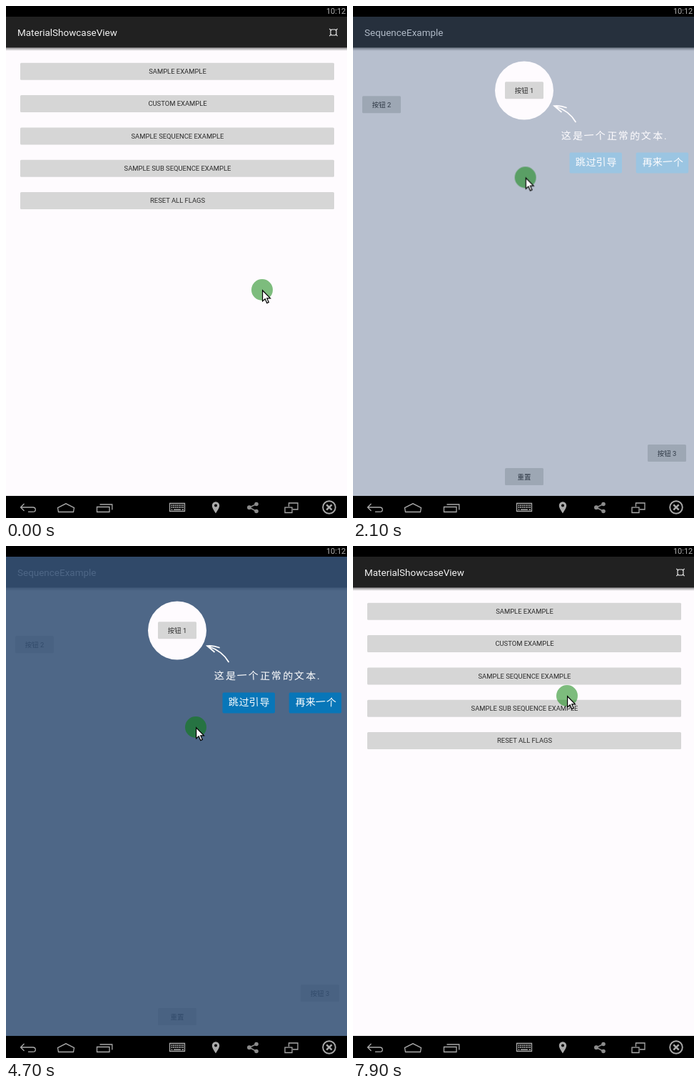
Animation, 478 px wide and 718 px high, one loop 8000 ms. Source, as an HTML page:

```html
<!DOCTYPE html>
<html lang="en">
<head>
<meta charset="utf-8">
<title>Showcase sequence</title>
<style>
  html, body { margin: 0; width: 100%; height: 100%; overflow: hidden; background: #000; }
  svg { display: block; width: 478px; height: 718px; }
  text { font-family: Roboto, "Noto Sans CJK SC", "Noto Sans CJK", sans-serif; }
  .title { font-size: 13.47px; fill: #f2f2f2; }
  .page { fill: #fefbfe; }
  .btn { fill: #d6d6d6; }
  .label { font-size: 9.42px; fill: #2b2b2b; text-anchor: middle; }
  .hand { font-family: "Noto Sans CJK SC", "Noto Sans CJK", sans-serif; font-size: 14px; font-weight: 400; fill: #fff; }
  .cta { fill: #0876b8; }
  .icon { fill: none; stroke: #aaa; stroke-width: 1.3; }
  .solid { fill: #aaa; }

  /* One tick is 200 ms = 2.5% of the loop. */
  .window, .dim, .showcase, .press, .glow, .pointer { animation: 8s step-end infinite; }
  .window { animation-name: window; transform-origin: 240px 350px; }
  .dim { animation-name: dim; }
  .showcase { animation-name: showcase; }
  .press { animation-name: press; }
  .glow { animation-name: glow; }
  .pointer { animation-name: pointer; }

  @keyframes window {
    0% { opacity: 0; transform: scale(.8); }
    21.25% { opacity: .52; transform: scale(.912); }
    23.75% { opacity: 1; transform: scale(1); }
    76.25% { opacity: .5; transform: scale(.88); }
    78.75% { opacity: .045; transform: scale(.807); }
    81.25%, 100% { opacity: 0; transform: scale(.8); }
  }
  @keyframes dim {
    0% { opacity: 0; }
    21.25% { opacity: .13; }
    23.75%, 100% { opacity: 0; }
  }
  @keyframes showcase {
    0% { opacity: 0; }
    26.25% { opacity: .4; }
    28.75% { opacity: .87; }
    31.25%, 100% { opacity: 1; }
  }
  @keyframes press {
    0% { opacity: 0; }
    18.75% { opacity: .16; }
    21.25%, 100% { opacity: 0; }
  }
  @keyframes glow {
    0% { opacity: 0; }
    73.75% { opacity: 1; }
    78.75% { opacity: .6; }
    81.25%, 100% { opacity: 0; }
  }
  @keyframes pointer {
    0% { transform: translate(359px, 398px); }
    6.25% { transform: translate(352px, 380px); animation-timing-function: steps(3); }
    13.75% { transform: translate(252px, 200px); }
    16.25% { transform: translate(236px, 179px); }
    18.75% { transform: translate(235px, 177px); }
    21.25% { transform: translate(235px, 205px); animation-timing-function: steps(3); }
    28.75% { transform: translate(245px, 258px); }
    58.75% { transform: translate(266px, 254px); }
    61.25% { transform: translate(272px, 258px); animation-timing-function: steps(3); }
    68.75% { transform: translate(60px, 650px); }
    71.25% { transform: translate(27px, 695px); animation-timing-function: steps(3); }
    78.75% { transform: translate(39px, 692px); }
    81.25% { transform: translate(80px, 630px); animation-timing-function: steps(2); }
    86.25% { transform: translate(400px, 120px); }
    88.75% { transform: translate(454px, 36px); }
    91.25% { transform: translate(440px, 52px); animation-timing-function: steps(3); }
    98.75%, 100% { transform: translate(300px, 210px); }
  }
</style>
</head>
<body>
<svg viewBox="0 0 478 718" width="478" height="718">
  <defs>
    <linearGradient id="shade" x2="0" y2="1">
      <stop offset="0" stop-opacity=".42"/>
      <stop offset="1" stop-opacity="0"/>
    </linearGradient>
    <radialGradient id="halo">
      <stop offset="0" stop-color="#444"/>
      <stop offset=".8" stop-color="#2a2a2a"/>
      <stop offset="1" stop-color="#000"/>
    </radialGradient>
    <g id="screen">
      <rect class="page" y="15" width="478" height="672"/>
      <rect y="15" width="478" height="43.5" fill="#212121"/>
      <rect y="58.5" width="478" height="4.5" fill="url(#shade)"/>
    </g>
    <rect id="wide" class="btn" x="20" width="440" height="24" rx="1.5"/>
    <rect id="small" class="btn" width="54" height="24" rx="1.5"/>
    <rect id="cta" class="cta" y="205.5" width="73.5" height="29" rx="2"/>
    <clipPath id="nav"><rect y="687" width="478" height="31"/></clipPath>
  </defs>

  <rect width="478" height="718"/>

  <!-- Main list -->
  <use href="#screen"/>
  <text class="title" x="16" y="42.3">MaterialShowcaseView</text>
  <g fill="none" stroke="#f2f2f2" stroke-width="1.1">
    <path d="M456.5 33h5l1.5 1.5v5l-1.5 1.5h-5l-1.5-1.5v-5z"/>
    <path d="M453.3 31.8l2.4 2.2M464.7 31.8l-2.4 2.2M453.3 42.2l2.4-2.2M464.7 42.2l-2.4-2.2"/>
  </g>
  <use href="#wide" y="79.8"/>
  <use href="#wide" y="125.1"/>
  <use href="#wide" y="170.4"/>
  <use href="#wide" y="215.8"/>
  <use href="#wide" y="261.1"/>
  <rect class="press" x="20" y="170.4" width="440" height="24" rx="1.5"/>
  <g class="label">
    <text x="240.5" y="95">SAMPLE EXAMPLE</text>
    <text x="240.5" y="140.4">CUSTOM EXAMPLE</text>
    <text x="240.5" y="185.7">SAMPLE SEQUENCE EXAMPLE</text>
    <text x="240.5" y="231">SAMPLE SUB SEQUENCE EXAMPLE</text>
    <text x="240.5" y="276.4">RESET ALL FLAGS</text>
  </g>
  <rect class="dim" y="15" width="478" height="672"/>

  <!-- Sequence window -->
  <g class="window">
    <use href="#screen"/>
    <text class="title" x="16" y="42.3">SequenceExample</text>
    <use href="#small" x="213" y="106.3"/>
    <use href="#small" x="13" y="126.3"/>
    <use href="#small" x="413" y="615"/>
    <use href="#small" x="213" y="648"/>
    <g class="label">
      <text x="240" y="121.8">按钮 1</text>
      <text x="40" y="141.8">按钮 2</text>
      <text x="440" y="630.5">按钮 3</text>
      <text x="240" y="663.5">重置</text>
    </g>
    <g class="showcase">
      <path fill="#335075" fill-opacity=".867" fill-rule="evenodd"
        d="M0 15H478V687H0ZM199 118.5a41 41 0 0 0 82 0a41 41 0 0 0-82 0Z"/>
      <path d="M312 162.5Q303 147 283 140.5M299 142.5Q290 139 282 140L292 148.5"
        fill="none" stroke="#fff" stroke-width="1.7" stroke-linecap="round"/>
      <use href="#cta" x="303.5"/>
      <use href="#cta" x="396.7"/>
      <g class="hand">
        <text x="292" y="187" letter-spacing="2" rotate="-3 2 -4 -3 2 -2 3 -2 3 0">这是一个正常的文本.</text>
        <text x="312" y="224" letter-spacing=".4" rotate="-3 2 -2 3">跳过引导</text>
        <text x="405.5" y="224" letter-spacing=".4" rotate="2 -3 -4 2">再来一个</text>
      </g>
    </g>
  </g>

  <!-- System bars -->
  <text x="476.3" y="11.3" text-anchor="end" font-size="11" fill="#b0b0b0">10:12</text>
  <rect y="687" width="478" height="31"/>
  <g clip-path="url(#nav)">
    <circle class="glow" cx="30" cy="703" r="29" fill="url(#halo)"/>
  </g>
  <g class="icon">
    <path d="M25.5 698L20.5 703L25.5 708M20.5 703H37.5Q41.3 703 41.3 706.2T37.5 709.4H31"/>
    <path d="M72.5 703.6L84 697.8L95.5 703.6L94.5 709.5H73.5Z"/>
    <path d="M127.5 702.5H145V709.5H127.5ZM131.5 699H148.8V706.5"/>
    <path d="M229.5 697.5H250.5V708.5H229.5Z"/>
    <path d="M231.5 700.3H249M231.5 703.2H249" stroke-width="1.8" stroke-dasharray="1.8 .8"/>
    <path d="M231.5 706.2h2M235 706.2h10M246.5 706.2h2.5" stroke-width="1.6"/>
    <path d="M351 698.5L341 703.2L351 708.5" stroke="#8c8c8c" stroke-width="1.6"/>
    <path d="M396.5 702V697H409V706H402M391 703.2H401V710.5H391Z"/>
    <circle cx="453" cy="703" r="8.8" stroke-width="1.9"/>
    <path d="M449.3 699.3l7.4 7.4M456.7 699.3l-7.4 7.4" stroke-width="2.5"/>
  </g>
  <path class="solid" fill-rule="evenodd"
    d="M294 711.5C291.500 707 288.800 704 288.800 700.500a5.200 5.200 0 0 1 10.400 0C299.200 704 296.500 707 294 711.500ZM292 700.500a2 2 0 0 0 4 0a2 2 0 0 0-4 0Z"/>
  <g fill="#8c8c8c">
    <circle cx="341" cy="703.2" r="3"/>
    <circle cx="351" cy="698.5" r="2.8"/>
    <circle cx="351" cy="708.5" r="2.8"/>
  </g>

  <!-- Pointer -->
  <g class="pointer">
    <circle r="15" fill="#008000" fill-opacity=".51"/>
    <path d="M.6.8V16L4.200 12.800L6.800 18.600L9.300 17.500L6.800 11.900H11.500Z"
      fill="#fff" stroke="#000" stroke-width="1.2"/>
  </g>
</svg>
</body>
</html>
```
